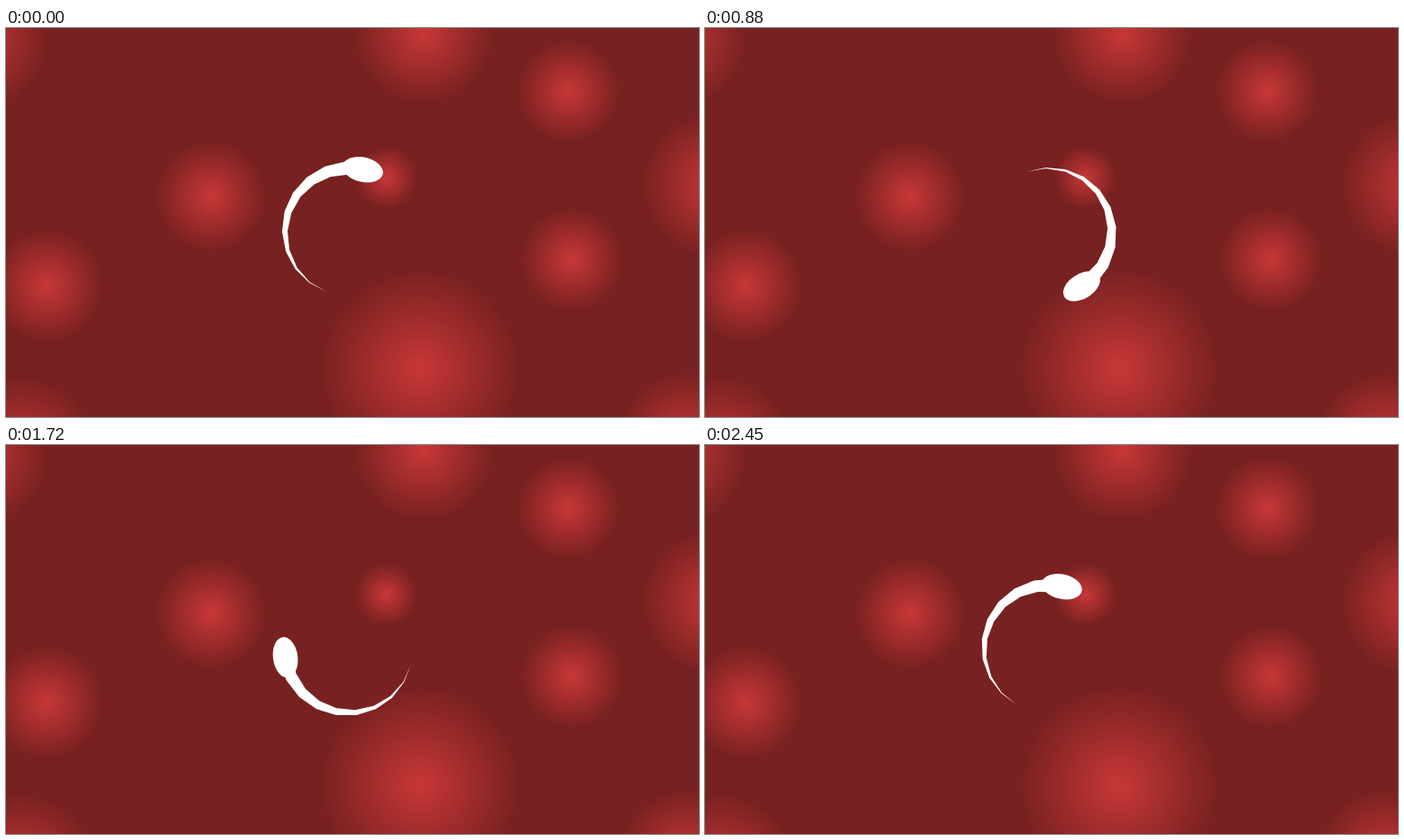
Write an HTML page with a canvas that moves like this. It is 768 by 432 pixels and loops after 2.55 s.

```html
<!DOCTYPE html>
<html lang="en">
<head>
<meta charset="utf-8">
<title>Swimmer</title>
<style>
  html, body { margin: 0; width: 100%; height: 100%; overflow: hidden; background: #782121; }
  canvas { display: block; }
</style>
</head>
<body>
<canvas width="768" height="432"></canvas>
<script>
const ctx = document.querySelector('canvas').getContext('2d');
const LOOP = 2550, RAD = Math.PI / 180;
const CENTER = { x: 380, y: 226.5 }, RADIUS = 71;

// Even steps around the circle; the motion pauses briefly at a few of them.
const STEPS = 85, START = -77.4, STEP_TIME = 22.4, PAUSE = 77.6;
const pauses = [6, 12, 44, 48, 51, 61, 74];

const GRID = 17.55, GRID_ORIGIN = -4, TAIL_POINTS = 10;

// Glowing cells: x, y, radius
const cells = [
  [463, 6, 78], [623, 70, 57], [421.5, 166, 34.7], [227, 187, 61.5],
  [45, 286, 63], [459, 378, 111], [627, 257, 57], [786, 174, 81],
  [-35, 10, 82], [15, 475, 88], [755, 460, 78]
];

function stepAt(time) {
  let moving = time;
  for (const step of pauses) {
    const start = (step + 1) * STEP_TIME;
    if (moving > start) moving = Math.max(start - 0.01, moving - PAUSE);
  }
  return Math.min(STEPS, Math.floor(moving / STEP_TIME));
}

function onCircle(degrees) {
  return {
    x: CENTER.x + RADIUS * Math.cos(degrees * RAD),
    y: CENTER.y + RADIUS * Math.sin(degrees * RAD)
  };
}

function drawBackground() {
  ctx.fillStyle = '#782121';
  ctx.fillRect(0, 0, 768, 432);
  for (const [x, y, r] of cells) {
    const glow = ctx.createRadialGradient(x, y, 0, x, y, r);
    glow.addColorStop(0, '#c83737');
    glow.addColorStop(1, 'rgba(200, 55, 55, 0)');
    ctx.fillStyle = glow;
    ctx.fillRect(x - r, y - r, 2 * r, 2 * r);
  }
}

// The tail joins points left behind on the circle at even angles.
function drawTail(headAngle) {
  const newest = Math.floor((headAngle - GRID_ORIGIN) / GRID);
  const outer = [], inner = [];
  for (let i = 0; i < TAIL_POINTS; i++) {
    const angle = GRID_ORIGIN + GRID * (newest - TAIL_POINTS + 1 + i);
    const p = onCircle(angle), half = Math.max(0, 0.87 * (i - 0.5));
    const normal = (angle - GRID / 2) * RAD;
    const dx = half * Math.cos(normal), dy = half * Math.sin(normal);
    outer.push([p.x + dx, p.y + dy]);
    inner.unshift([p.x - dx, p.y - dy]);
  }
  ctx.beginPath();
  for (const [x, y] of [...outer, ...inner]) ctx.lineTo(x, y);
  ctx.fill();
}

function drawHead(angle) {
  const { x, y } = onCircle(angle);
  ctx.beginPath();
  ctx.ellipse(x, y, 22.6, 13.7, (angle + 90) * RAD, 0, 2 * Math.PI);
  ctx.fill();
}

function draw(time) {
  const angle = START + 360 * stepAt(time) / STEPS;
  drawBackground();
  ctx.fillStyle = '#fff';
  drawTail(angle);
  drawHead(angle);
}

function tick() {
  draw(performance.now() % LOOP);
  requestAnimationFrame(tick);
}
tick();
</script>
</body>
</html>
```
